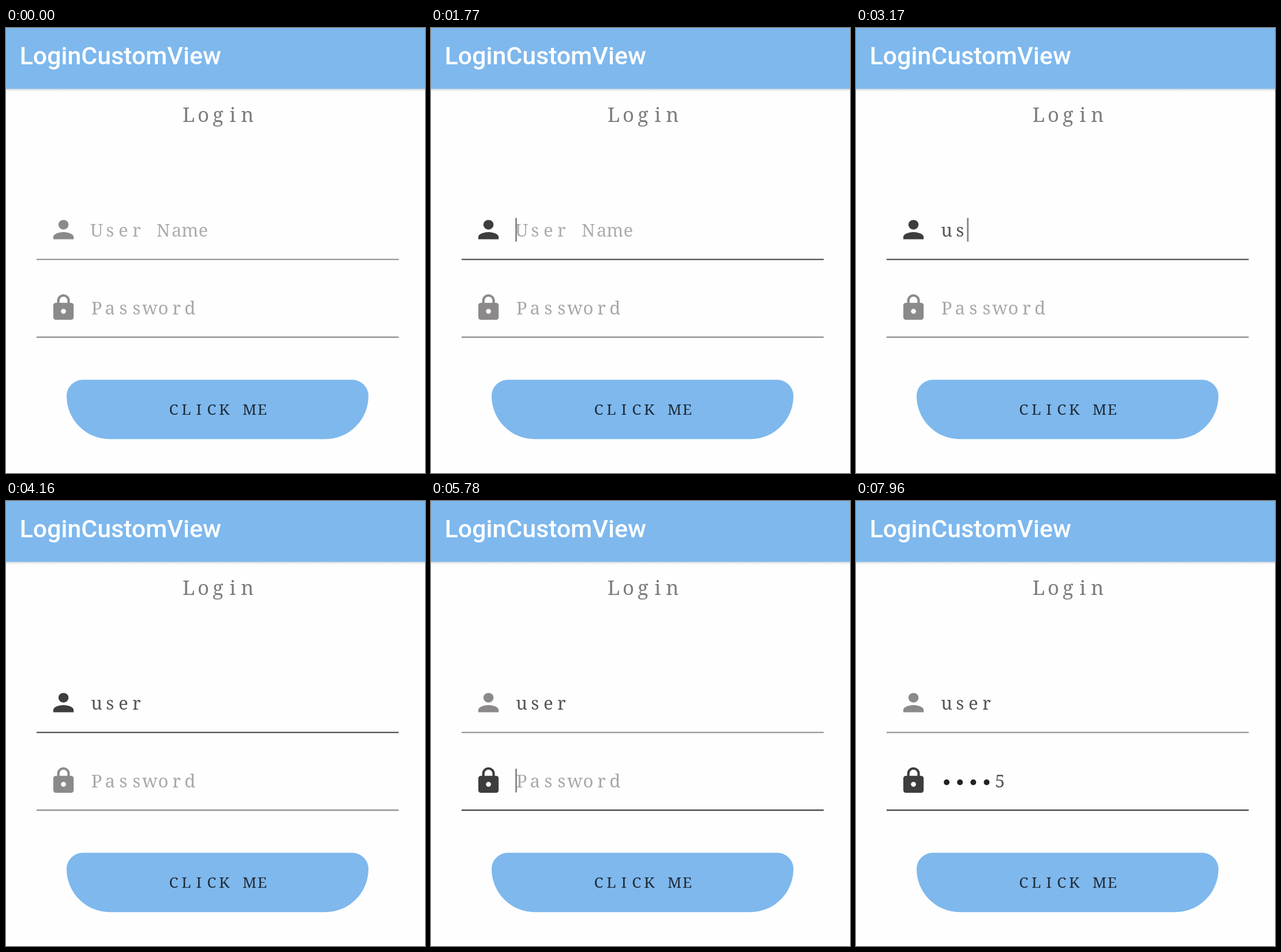
An HTML page that plays this animation: 726 by 772 pixels, repeating every 8000 ms.

```html
<!DOCTYPE html>
<html lang="en">
<head>
<meta charset="utf-8">
<title>Login form</title>
<style>
  html, body { margin: 0; width: 100%; height: 100%; overflow: hidden; background: #fefefe; }
  svg { display: block; width: 100%; height: 100%; }
  .mono { font-family: "Noto Serif", serif; font-weight: 200; text-anchor: middle; }
  .title { font: 500 42.8px Roboto, sans-serif; fill: #fff; }
  .field { color: #8b8989; }
  .field.active { color: #3e3d3e; }
  .icon { fill: currentColor; }
  .line { stroke: currentColor; stroke-width: 2.2; }
</style>
</head>
<body>
<svg viewBox="0 0 726 772">
  <defs>
    <linearGradient id="shadow" x2="0" y2="1">
      <stop stop-color="#cfd3d8"/>
      <stop offset="1" stop-color="#fefefe"/>
    </linearGradient>
  </defs>
  <rect width="726" height="772" fill="#fefefe"/>
  <rect y="105" width="726" height="5" fill="url(#shadow)"/>
  <rect width="726" height="105.5" fill="#7eb8ed"/>
  <text class="title" x="23.7" y="63">LoginCustomView</text>
  <text class="mono" id="heading" y="162.5" font-size="34.5" fill="#7c7c7c"></text>

  <g class="field" id="user">
    <path class="icon" transform="translate(73.2 324.5) scale(2.2 2.1)"
      d="M12 12a4 4 0 1 0 0-8 4 4 0 0 0 0 8zm0 2c-2.7 0-8 1.3-8 4v2h16v-2c0-2.7-5.3-4-8-4z"/>
    <path class="line" d="M53 401.5H680.5"/>
    <text class="mono" id="userText" y="361.5" font-size="31"></text>
  </g>

  <g class="field" id="password">
    <path class="icon" fill-rule="evenodd" transform="translate(73.2 460) scale(2.2 2.1)"
      d="M18 8h-1V6A5 5 0 0 0 7 6v2H6a2 2 0 0 0-2 2v10a2 2 0 0 0 2 2h12a2 2 0 0 0 2-2V10a2 2 0 0 0-2-2z
         M8.9 8V6a3.1 3.1 0 0 1 6.2 0v2z M12 17a2 2 0 1 0 0-4 2 2 0 0 0 0 4z"/>
    <path class="line" d="M53 536.3H680.5"/>
    <text class="mono" id="passwordText" y="497" font-size="31"></text>
    <g id="dots" fill="#222"></g>
  </g>

  <rect id="cursor" width="2.8" height="41" fill="#858585"/>
  <path fill="#7eb8ed" d="M133 610.3H600a28 28 0 0 1 28 28a75 75 0 0 1-75 75H180a75 75 0 0 1-75-75a28 28 0 0 1 28-28z"/>
  <text class="mono" id="button" y="670.5" font-size="26" fill="#1f2b38"></text>
</svg>
<script>
const LOOP = 8000, CELL = 23.1, LEFT = 145.5;
const FOCUS_USER = 1370, HIGHLIGHT_USER = 1520, FOCUS_PASSWORD = 4390;
const userKeys = [2620, 3090, 3390, 3660];
const passwordKeys = [5860, 6250, 6720, 6980, 7310];
const cursorOn = [[1370, 1940], [2470, 4160], [4390, 5010], [5630, 7810]];
const $ = id => document.getElementById(id);

// Places every character in the middle of its own fixed-width cell.
function setMono(el, text, first, step) {
  el.setAttribute("x", [...text].map((_, i) => first + i * step).join(" "));
  el.textContent = text;
}

function setInput(id, text, fill, skip = 0) {
  const el = $(id);
  setMono(el, text, LEFT + CELL * (skip + 0.5), CELL);
  el.setAttribute("fill", fill);
}

const typedAt = (keys, t) => keys.filter(time => time <= t).length;

setMono($("heading"), "Login", 316.5, 25.4);
setMono($("button"), "CLICK ME", 290.5, 21.9);
$("dots").innerHTML = passwordKeys.slice(1).map((_, i) =>
  `<circle cx="${LEFT + CELL * (i + 0.5)}" cy="488" r="5"/>`).join("");

function draw(t) {
  const userCount = typedAt(userKeys, t);
  const passwordCount = typedAt(passwordKeys, t);
  const inPassword = t >= FOCUS_PASSWORD;

  $("user").classList.toggle("active", t >= HIGHLIGHT_USER && !inPassword);
  $("password").classList.toggle("active", inPassword);

  const pressed = t >= FOCUS_USER && t < HIGHLIGHT_USER;
  if (userCount) setInput("userText", "user".slice(0, userCount), "#555");
  else setInput("userText", "User Name", pressed ? "#8c8c8c" : "#adadad");

  if (passwordCount) setInput("passwordText", String(passwordCount), "#555", passwordCount - 1);
  else setInput("passwordText", "Password", "#a8a8a8");
  [...$("dots").children].forEach((dot, i) =>
    dot.setAttribute("visibility", i < passwordCount - 1 ? "visible" : "hidden"));

  const cursor = $("cursor");
  const visible = cursorOn.some(([from, to]) => t >= from && t < to);
  cursor.setAttribute("visibility", visible ? "visible" : "hidden");
  cursor.setAttribute("x", LEFT + 0.6 + CELL * (inPassword ? passwordCount : userCount));
  cursor.setAttribute("y", inPassword ? 464.5 : 329.5);
}

const start = performance.now();
function tick() {
  draw((performance.now() - start) % LOOP);
  requestAnimationFrame(tick);
}
tick();
</script>
</body>
</html>
```
